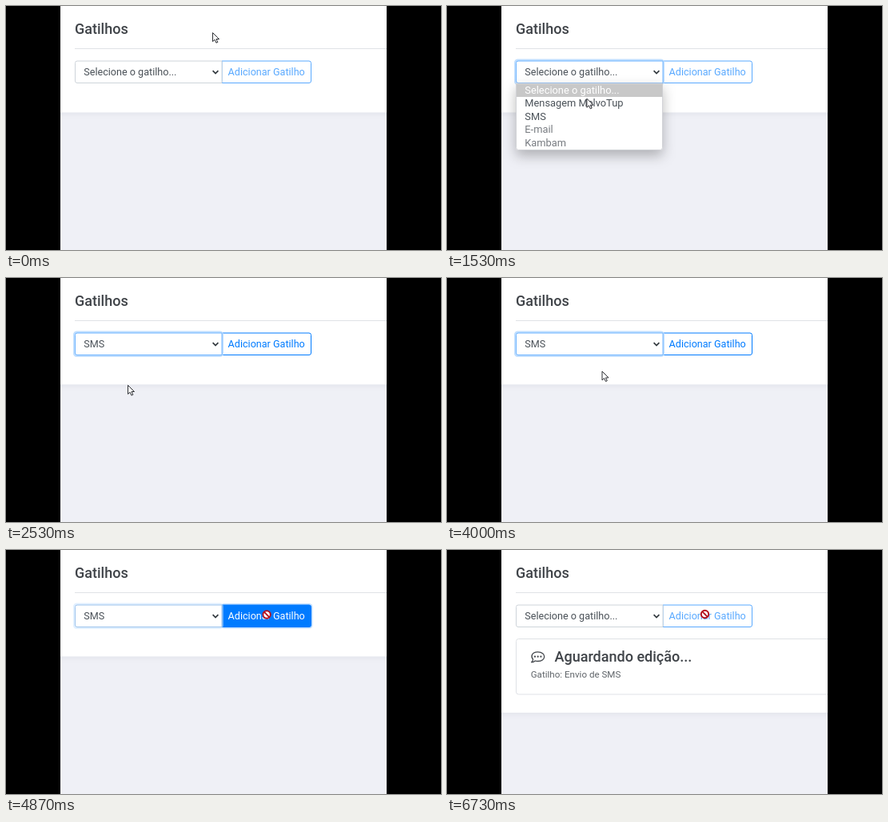
An HTML page for the animation above (6990 ms loop, 544 by 306 pixels).

```html
<!DOCTYPE html>
<html lang="pt">
<head>
<meta charset="utf-8">
<style>
  html, body { margin: 0; width: 100%; height: 100%; overflow: hidden; background: #000; }
  svg { display: block; width: 544px; height: 306px; font: 12.6px Roboto, sans-serif; }
  .title { font-size: 18px; font-weight: 500; fill: #3f4348; }
  .field { fill: #495057; }
  .list { font-size: 12.85px; }
  .line { fill: none; stroke: #dfe2e6; }
</style>
</head>
<body>
<svg viewBox="0 0 544 306">
  <defs>
    <clipPath id="view"><rect x="68" width="408" height="306"/></clipPath>
    <filter id="soft" x="-20%" y="-20%" width="140%" height="140%"><feGaussianBlur stdDeviation="3"/></filter>
    <filter id="drop" x="-30%" y="-40%" width="160%" height="200%">
      <feDropShadow dx="0" dy="7" stdDeviation="8" flood-color="#000" flood-opacity=".27"/>
    </filter>
  </defs>
  <rect width="544" height="306"/>
  <g clip-path="url(#view)">
    <rect x="68" width="408" height="306" fill="#eff0f6"/>
    <rect id="shade" x="60" y="-10" width="424" fill="#d9dbe3" opacity=".6" filter="url(#soft)"/>
    <rect id="panel" x="68" width="408" fill="#fff"/>
    <text class="title" x="86" y="34.7">Gatilhos</text>
    <path class="line" d="M86 53.5H476"/>

    <g id="card">
      <rect class="line" x="86.5" y="111.5" width="420" height="69.5" rx="3"/>
      <path d="M107.6 137.2C104.6 134 105.6 127.9 113.6 127.9C124.4 127.9 124.4 139.5 113.6 139.5Q111.8 139.5 110.2 139Q108.4 140.8 105.7 140.8Q107.5 139 107.6 137.2Z"
        fill="none" stroke="#43474c" stroke-width="1.3" stroke-linejoin="round"/>
      <g fill="#43474c"><circle cx="110" cy="133.7" r="1.1"/><circle cx="113.7" cy="133.7" r="1.1"/><circle cx="117.4" cy="133.7" r="1.1"/></g>
      <text class="title" x="134.5" y="140">Aguardando edição...</text>
      <text x="104.7" y="160.3" font-size="11.6" fill="#5f6469">Gatilho: Envio de SMS</text>
    </g>

    <rect id="btnRing" x="268.5" y="67" width="115" height="31.5" rx="4.5" fill="#bfdeff"/>
    <path id="btn" d="M270 69H379Q381.5 69 381.5 71.5V94Q381.5 96.5 379 96.5H270Z"/>
    <text id="label" x="277.6" y="87">Adicionar Gatilho</text>

    <rect id="ring" x="84" y="66.5" width="188" height="32.5" rx="4.5" fill="#bfdeff"/>
    <path id="box" d="M270 69H89Q86.5 69 86.5 71.5V94Q86.5 96.5 89 96.5H270Z" fill="#fff"/>
    <text id="value" class="field" x="97.3" y="87.4"></text>
    <path d="M258.6 81.2L262 84.6L265.4 81.2" fill="none" stroke="#343a40" stroke-width="1.7"/>

    <g id="menu">
      <path d="M86.5 97H269.5V177.5Q269.5 180.5 266.5 180.5H89.5Q86.5 180.5 86.5 177.5Z" fill="#fff" stroke="#c9cbd0" stroke-width=".8" filter="url(#drop)"/>
      <rect id="mark" x="87" width="182.3" height="16.6"/>
      <g id="items" class="list"></g>
    </g>

    <g id="pointer">
      <path id="arrow" d="M.5 .5V11.6L3.1 9.2L4.9 13.2L6.8 12.4L5 8.5H8.5Z" fill="#fff" stroke="#22242a" stroke-width=".95" stroke-linejoin="round"/>
      <path id="hand" d="M-1.2 8V.8Q0 -.8 1.2 .8V5L6 6Q7.3 6.4 7.2 8L6.2 13H-.2L-4 8.6Q-3.6 6.8 -1.2 8.4Z" fill="#fff" stroke="#22242a" stroke-width=".95" stroke-linejoin="round"/>
      <g id="stop" fill="#fff" stroke="#b5121f" stroke-width="1.9"><circle r="4.7"/><path d="M-3.3 -3.3L3.3 3.3"/></g>
    </g>
  </g>
</svg>
<script>
const LOOP = 6990, STEP = 1000 / 15;
const OPEN = 930, HOVER = 1590, HOVER_SMS = 1860, PICK = 2330, OVER = 4260, CLICK = 4790, DONE = 4925;
const PROMPT = "Selecione o gatilho...";
const options = [PROMPT, "Mensagem MelvoTup", "SMS", "E-mail", "Kambam"];
// time, x, y
const path = [
  [0, 258, 33], [70, 258, 33], [330, 228, 57], [600, 195, 81], [800, 193, 82],
  [1070, 193, 84], [1330, 183, 102], [1530, 174.5, 115.5], [1800, 164, 126], [2200, 152, 134],
  [3730, 152, 134], [4000, 193.5, 116.5], [4270, 272, 94], [4470, 318, 82], [4600, 326, 81],
  [6100, 326.5, 81], [6130, 322.5, 80.5]
];

const $ = id => document.getElementById(id);
const set = (id, attrs) => { for (const k in attrs) $(id).setAttribute(k, attrs[k]); };
const show = (id, on) => { $(id).style.display = on ? "" : "none"; };
const fade = (t, start, end) =>
  Math.min(1, Math.max(0, (t - start) / 150)) * (1 - Math.min(1, Math.max(0, (t - end) / 150)));
const mix = (a, b, p) => `rgb(${a.map((v, i) => Math.round(v + (b[i] - v) * p))})`;

const WHITE = [255, 255, 255], BLUE = [0, 123, 255], PALE = [89, 169, 255];
const GREY = [206, 212, 218], FOCUS = [110, 180, 255];

const rows = options.map((name, i) => {
  const row = document.createElementNS("http://www.w3.org/2000/svg", "text");
  row.textContent = name;
  row.setAttribute("x", 97.3);
  row.setAttribute("y", 109.6 + 16.6 * i);
  $("items").append(row);
  return row;
});

function place(t) {
  let i = path.findIndex(p => p[0] > t);
  if (i < 0) return path.at(-1).slice(1);
  const [t0, x0, y0] = path[i - 1], [t1, x1, y1] = path[i];
  const p = (t - t0) / (t1 - t0);
  return [x0 + (x1 - x0) * p, y0 + (y1 - y0) * p];
}

function draw(t) {
  const done = t >= DONE, picked = t >= PICK && !done;
  const bottom = done ? 204 : 133.5;
  set("panel", { height: bottom });
  set("shade", { height: bottom + 12 });
  show("card", done);

  const focus = fade(t, 865, CLICK);
  set("ring", { opacity: focus });
  set("box", { stroke: mix(GREY, FOCUS, focus) });
  $("value").textContent = picked ? "SMS" : PROMPT;

  const fill = done ? 0 : fade(t, OVER, LOOP);
  const edge = mix(PALE, BLUE, done ? 0 : fade(t, PICK, LOOP));
  set("btn", { fill: mix(WHITE, BLUE, fill), stroke: edge });
  set("label", { fill: fill > .5 ? "#fff" : edge });
  set("btnRing", { opacity: done ? 0 : fade(t, CLICK - 70, LOOP) });

  show("menu", t >= OPEN && t < PICK);
  const active = t < HOVER ? 0 : t < HOVER_SMS ? 1 : 2;
  set("mark", { y: 97.4 + 16.6 * active, fill: active ? "#1e90ff" : "#c8c8c8" });
  rows.forEach((row, i) => row.setAttribute("fill",
    i === active ? "#fff" : i === 1 || i === 2 ? "#495057" : "#777b80"));

  const [x, y] = place(t);
  set("pointer", { transform: `translate(${x} ${y})` });
  show("arrow", t < OVER);
  show("hand", t >= OVER && t < CLICK);
  show("stop", t >= CLICK);
}

const start = performance.now();
function tick() {
  const t = (performance.now() - start) % LOOP;
  draw(Math.floor((t + 5) / STEP) * STEP);
  requestAnimationFrame(tick);
}
tick();
</script>
</body>
</html>
```
